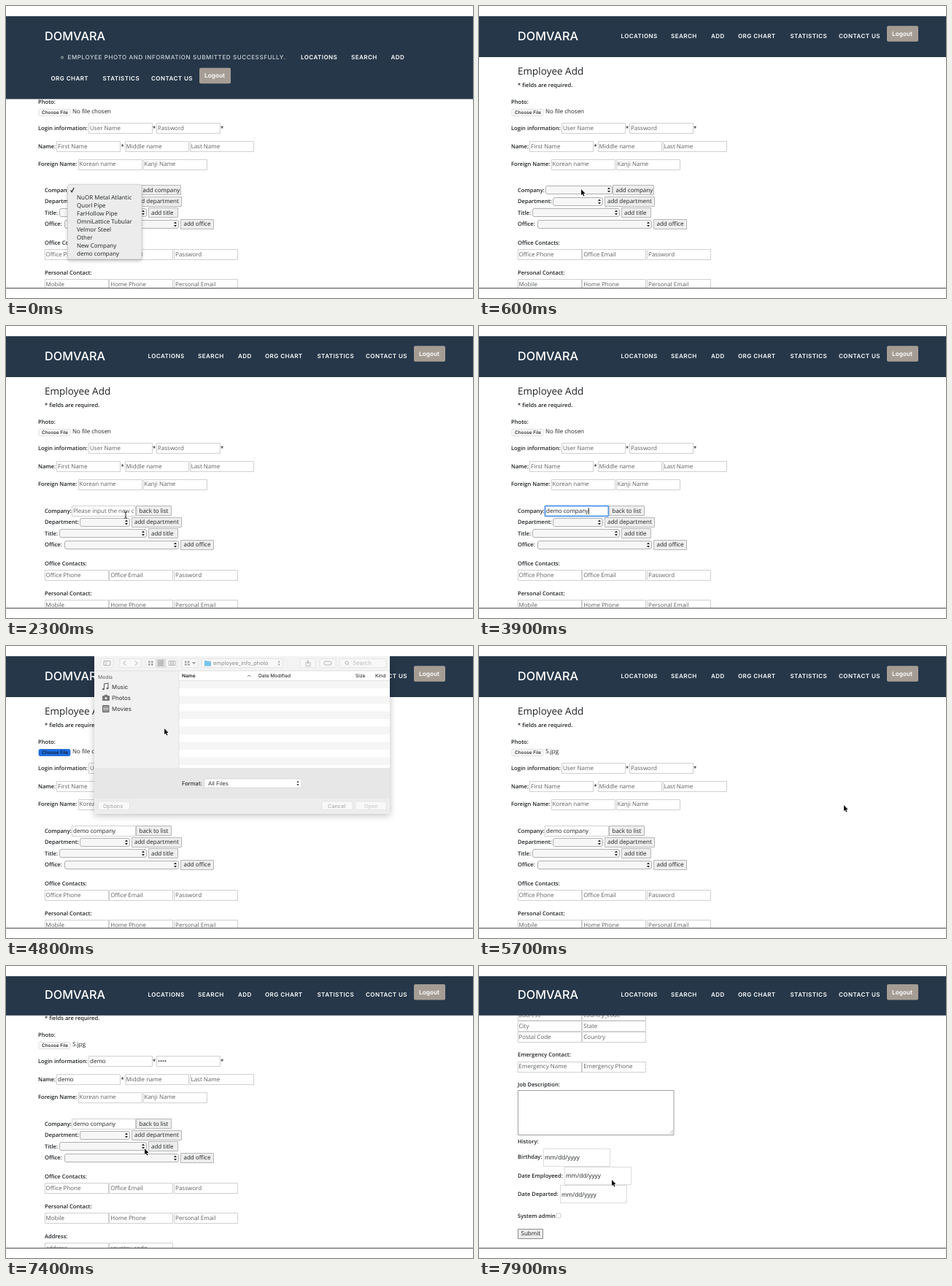
Write an HTML page with a canvas that moves like this. It is 640 px wide and 400 px high and loops after 8000 ms.

```html
<!DOCTYPE html>
<html lang="en">
<head>
<meta charset="utf-8">
<title>Employee Add</title>
<style>
  html, body { margin: 0; width: 100%; height: 100%; overflow: hidden; background: #fff; }
  canvas { display: block; width: 640px; height: 400px; }
</style>
</head>
<body>
<canvas></canvas>
<script>
const LOOP = 8000, STEP = 100, SCROLL_END = 356;
const BODY = '"Open Sans", "Noto Sans", sans-serif';
const SYSTEM = 'Inter, "Liberation Sans", sans-serif';
const INK = '#1d2124', HINT = '#5c5e61', NAVY = '#263749', BLUE = '#5b9dea';

const canvas = document.querySelector('canvas');
const c = canvas.getContext('2d');
const dpr = window.devicePixelRatio || 1;
canvas.width = 640 * dpr;
canvas.height = 400 * dpr;
c.scale(dpr, dpr);
c.textRendering = 'geometricPrecision'; // keeps fractional letter widths at small sizes

// Text is placed by its left edge and the middle of its capitals.
function text(s, x, y, { size = 8, color = INK, weight = 500, font = BODY, gap = 0 } = {}) {
  c.font = `${weight} ${size}px ${font}`;
  c.letterSpacing = gap + 'px';
  c.fillStyle = color;
  c.fillText(s, x, y + size * 0.36);
  return c.measureText(s).width;
}
const label = (s, x, y) => text(s, x, y, { size: 7.6, weight: 600 });

function box(x, y, w, h, fill, stroke, r = 0, line = 1) {
  c.beginPath();
  c.roundRect(x, y, w, h, r);
  if (fill) { c.fillStyle = fill; c.fill(); }
  if (stroke) { c.strokeStyle = stroke; c.lineWidth = line; c.stroke(); }
}

function path(points, color, width = 1) {
  c.beginPath();
  points.forEach(([x, y]) => c.lineTo(x, y));
  c.strokeStyle = color;
  c.lineWidth = width;
  c.stroke();
}

function shape(points, color) {
  c.beginPath();
  points.forEach(([x, y]) => c.lineTo(x, y));
  c.closePath();
  c.fillStyle = color;
  c.fill();
}

function shadowed(blur, draw) {
  c.save();
  c.shadowColor = 'rgba(0,0,0,.25)';
  c.shadowBlur = blur * dpr;
  c.shadowOffsetY = 2 * dpr;
  draw();
  c.restore();
}

// Widget outlines sit on half pixels so that they stay sharp.
const snap = v => Math.round(v) + .5;

function field(x, y, hint, { value = '', focus = false } = {}) {
  box(snap(x), snap(y) - 7, 87, 14, '#fff', focus ? BLUE : '#d0d0d0', focus ? 1 : 0, focus ? 2 : 1);
  c.save();
  c.beginPath();
  c.rect(x, y - 7, 86, 15);
  c.clip();
  const w = text(value || hint, x + 2, y, { color: value ? INK : HINT });
  if (focus) box(x + 2 + (value ? w : 0), y - 4, .8, 9, '#111');
  c.restore();
}

function button(s, x, y, w, edge = '#b8b8b8') {
  box(snap(x), snap(y) - 7, w - 1, 13, '#eeeeee', edge);
  text(s, x + 4.5, y);
}

function arrows(x, y, color = '#222', k = 1) {
  shape([[x - 2 * k, y - 1], [x + 2 * k, y - 1], [x, y - 3.6]], color);
  shape([[x - 2 * k, y + 1], [x + 2 * k, y + 1], [x, y + 3.6]], color);
}

function select(x, y, w) {
  box(snap(x), snap(y) - 6, w - 1, 11, '#f6f6f6', '#b0b0b0', 2.5);
  arrows(x + w - 5, Math.round(y));
}

const typed = (s, t, start, end) =>
  s.slice(0, Math.max(0, Math.ceil(s.length * Math.min(1, (t - start) / (end - start)))));

function upperForm(t) {
  text('Employee Add', 53, 89, { size: 13.5, weight: 400 });
  label('* fields are required.', 53, 108);
  label('Photo:', 44, 131);
  const pressed = t >= 4400 && t < 5000;
  box(45, 141.5, 43, 9, pressed ? '#1d6fe2' : '#fff', pressed ? '#1c62c8' : '#d2d2d2', 2, .8);
  text('Choose File', 49, 146, { size: 6.4, color: '#111', font: SYSTEM });
  text(t >= 5700 ? '5.jpg' : 'No file chosen', 91, 144.5);

  label('Login information:', 44, 167);
  field(113, 167, 'User Name', { value: typed('demo', t, 6400, 6700), focus: t >= 6100 && t < 6800 });
  label('*', 201, 167.5);
  field(206, 167, 'Password', { value: typed('••••', t, 6800, 7000), focus: t >= 6800 && t < 7000 });
  label('*', 294, 167.5);

  label('Name:', 44, 192);
  field(69, 192, 'First Name', { value: typed('demo', t, 7000, 7200), focus: t >= 7000 && t < 7300 });
  label('*', 157.5, 192.5);
  field(162.5, 192, 'Middle name');
  field(251.5, 192, 'Last Name');

  label('Foreign Name:', 44, 216.5);
  field(98.5, 216.5, 'Korean name');
  field(187.5, 216.5, 'Kanji Name');
}

function lowerForm(t) {
  label('Company:', 53, 253);
  if (t < 1900) {
    select(91, 253, 92);
    button('add company', 183, 253, 57);
  } else {
    field(90, 253, 'Please input the new company', {
      value: typed('demo company', t, 2700, 3600), focus: t >= 2500 && t < 4400 });
    button('back to list', 178, 253, 49);
  }
  label('Department:', 53, 268.5);
  select(101, 268.5, 69);
  button('add department', 171.5, 268.5, 69);
  label('Title:', 53, 284);
  select(73, 284, 120);
  button('add title', 194.5, 284, 41);
  label('Office:', 53, 299.5);
  select(80, 299.5, 157);
  button('add office', 239, 299.5, 46);

  const row = (y, ...hints) => hints.forEach((h, i) => field(53 + i * 88.8 - .5, y, h));
  label('Office Contacts:', 53, 325.5);
  row(341, 'Office Phone', 'Office Email', 'Password');
  label('Personal Contact:', 53, 366);
  row(382, 'Mobile', 'Home Phone', 'Personal Email');
  label('Address:', 53, 407);
  row(423, 'address', 'country_code');
  row(438, 'City', 'State');
  row(453, 'Postal Code', 'Country');
  label('Emergency Contact:', 53, 477.5);
  row(493.5, 'Emergency Name', 'Emergency Phone');

  label('Job Description:', 53, 518);
  box(53.5, 526.5, 213.5, 61, '#fff', '#a0a0a0');
  path([[261, 586], [266, 581]], '#999', .7);
  path([[264, 586], [266, 584]], '#999', .7);
  label('History:', 53, 596.5);
  [['Birthday:', 88], ['Date Employeed:', 117], ['Date Departed:', 111]].forEach(([s, x], i) => {
    const y = 617.5 + i * 25.4;
    label(s, 53, y);
    box(x + .5, snap(y - 12), 91, 24, '#fff', '#dcdcdc');
    text('mm/dd/yyyy', x + 2, y + .5, { size: 8.2 });
  });
  label('System admin', 53, 698);
  box(106, 695, 6, 6, '#fff', '#bbb', 1, .8);
  button('Submit', 53, 722.5, 35, '#8d8d8d');
}

function popup(items) {
  const h = 14.5 + items.length * 11;
  shadowed(5, () => box(84.5, 244.5, 101.5, h, '#ececec', null, 3));
  box(84.5, 244.5, 101.5, h, null, '#c4c4c4', 3, .6);
  path([[88.5, 252.5], [90.2, 254.8], [93.2, 249]], '#222', 1.2);
  items.forEach((s, i) => text(s, 97, 262.5 + i * 11));
}

const companies = ['NuOR Metal Atlantic', 'Quorl Pipe', 'FarHollow Pipe', 'OmniLattice Tubular',
  'Velmor Steel', 'Other', 'New Company'];

function nav(tall, lift) {
  const link = { size: 8, color: '#fff', weight: 600, font: SYSTEM, gap: .45 };
  const links = list => list.forEach(([s, x, y]) => text(s, x, y, link));
  const logout = (x, y) => {
    box(x, y - 10.8, 43, 21.6, '#a59d94', null, 2);
    text('Logout', x + 7, y, { ...link, size: 8.3, gap: 0 });
  };
  box(0, 14, 640, tall ? 113.5 : 56 - lift, NAVY);
  text('DOMVARA', 53, 41.5 - lift, { size: 16.3, color: '#fff', font: SYSTEM });
  if (tall) {
    c.beginPath();
    c.arc(77, 70.5, 1.5, 0, 7);
    c.strokeStyle = '#d0d5da';
    c.lineWidth = .8;
    c.stroke();
    text('EMPLOYEE PHOTO AND INFORMATION SUBMITTED SUCCESSFULLY.', 84.5, 70.5,
      { ...link, color: '#d0d5da', weight: 500, gap: .6 });
    links([['LOCATIONS', 404, 70.5], ['SEARCH', 473, 70.5], ['ADD', 527.5, 70.5],
      ['ORG CHART', 61.5, 99], ['STATISTICS', 132.5, 99], ['CONTACT US', 199, 99]]);
    logout(265, 95.5);
  } else {
    const y = 41.5 - lift;
    links([['LOCATIONS', 194.5, y], ['SEARCH', 263, y], ['ADD', 318, y], ['ORG CHART', 355, y],
      ['STATISTICS', 426.5, y], ['CONTACT US', 493, y]]);
    logout(559, 38 - lift);
  }
}

function fileDialog(t) {
  const ui = (s, x, y, size = 7.6, color = '#333', weight = 400) =>
    text(s, x, y, { size, color, weight, font: SYSTEM });
  const frame = (x, w, y = 17.5, h = 12) => box(x, y, w, h, '#f8f8f8', '#dedede', 2, .7);
  const grey = '#a3a3a3';
  const ready = t >= 4900, picked = t >= 5200;

  shadowed(9, () => box(121, 14, 405, 216, '#ededed'));
  box(121, 14, 405, 20, '#f3f3f3');
  box(121, 34, 116, 133, '#f1f1f1');
  box(237, 34, 289, 133, '#fff');
  for (let y = 47.5; y < 167; y += 21) box(237, y, 289, 10.5, '#f5f5f5');
  box(121, 167, 405, 42, '#e7e7e7');
  path([[121, 34], [526, 34]], '#d6d6d6', .7);
  path([[237, 47.5], [526, 47.5]], '#dcdcdc', .7);
  path([[237, 34], [237, 167]], '#dcdcdc', .7);

  // Toolbar
  [[130, 17], [156, 29], [191, 43], [241, 22], [268, 111], [403, 21], [430, 22], [457, 64]]
    .forEach(([x, w]) => frame(x, w));
  box(205, 17.5, 14.5, 12, '#dedede');
  box(134, 20.5, 9, 6, null, grey, 0, .8);
  path([[137, 20.5], [137, 26.5]], grey, .8);
  path([[164, 20.5], [161, 23.5], [164, 26.5]], grey);
  path([[177, 20.5], [180, 23.5], [177, 26.5]], grey);
  for (let i = 0; i < 4; i++) {
    box(195 + i % 2 * 4, 20.5 + (i >> 1) * 3.6, 2.6, 2.6, grey);
    path([[208, 20 + i * 2.2], [216, 20 + i * 2.2]], '#888', .8);
    box(245 + i % 2 * 4, 20.5 + (i >> 1) * 3.6, 2.6, 2.6, grey);
  }
  for (let i = 0; i < 3; i++) box(223 + i * 3, 20.5, 3, 6, null, grey, 0, .7);
  shape([[255, 22], [260, 22], [257.5, 25.5]], grey);
  shape([[272, 20], [275, 20], [276, 21], [281, 21], [281, 27.5], [272, 27.5]], '#76c3ea');
  ui('employee_info_photo', 284, 23.5, 7.5, '#8e8e8e');
  arrows(374, 23.5, grey, .8);
  box(411, 22.5, 6, 5, null, grey, 0, .7);
  path([[414, 25], [414, 19.5], [412.4, 21]], grey, .8);
  box(436, 21, 10, 5, null, grey, 2, .8);
  c.beginPath();
  c.arc(467, 23, 2.2, 0, 7);
  c.stroke();
  path([[468.6, 24.6], [470.5, 26.5]], grey, .8);
  ui('Search', 475, 23.5, 7.8, '#bcbcbc');

  // Sidebar
  ui('Media', 126, 43, 6.8, '#777', 500);
  path([[134.5, 59], [134.5, 52], [140, 51], [140, 58]], '#666', 1.1);
  box(132, 57.8, 3, 2.4, '#666', null, 1.2);
  box(137.5, 56.8, 3, 2.4, '#666', null, 1.2);
  box(132, 68, 10, 7, '#777', null, 1);
  box(135, 66.8, 4, 2, '#777');
  box(135.5, 70, 3, 3, '#eee', null, 1.5);
  box(132.5, 81.5, 8.5, 9, '#999', '#666', 0, 1);
  path([[133, 86], [141, 86]], '#eee', .8);
  ['Music', 'Photos', 'Movies'].forEach((s, i) => ui(s, 145, 56 + i * 15, 7.9));

  // File list
  ui('Name', 241, 41, 6.6, '#222', 600);
  path([[331, 42], [333, 40], [335, 42]], '#555', .8);
  ui('Date Modified', 346, 41, 6.6, '#333', 500);
  ui('Size', 479, 41, 6.6, '#333', 500);
  ui('Kind', 506, 41, 6.6, '#333', 500);
  if (ready) for (let i = 0; i < 5; i++) {
    const y = 53 + i * 10.5, on = picked && i === 4, ink = on ? '#fff' : '#333';
    if (on) box(237, y - 5.5, 289, 10.5, '#1e67d8');
    box(242, y - 3, 5, 6, '#cfd8df', '#a9b4bc', 0, .5);
    ui(`${i + 1}.jpg`, 251, y, 7, ink);
  }

  ui('Format:', 241, 188, 7.6, '#333', 500);
  box(272, 182, 133, 12, '#fff', '#d0d0d0', 2, .7);
  ui('All Files', 277, 188);
  arrows(400, 188, '#444', .8);
  frame(126.5, 43, 213, 11.5);
  frame(433, 42, 213, 11.5);
  frame(479, 42, 213, 11.5);
  ui('Options', 133, 219, 7.4, ready ? '#444' : grey);
  ui('Cancel', 441, 219, 7.4, ready ? '#444' : grey);
  ui('Open', 491, 219, 7.4, picked ? '#222' : '#c8c8c8');
}

// Pointer stops: time, x, y
const stops = [[100, 230, 200], [500, 140, 251], [700, 140, 251], [900, 145, 290], [1300, 190, 233],
  [1600, 210, 252], [1900, 210, 252], [2300, 164, 259], [2500, 150, 254], [3900, 150, 254],
  [4300, 68, 146], [4500, 68, 146], [4800, 217, 113], [5100, 260, 94], [5200, 260, 94],
  [5500, 500, 218], [5700, 500, 218], [6100, 174, 160], [7100, 174, 160], [7400, 190, 250],
  [7900, 182, 293]];

function pointer(t) {
  const hidden = t < 100 || (t >= 2700 && t < 4000) || (t >= 6400 && t < 7200);
  if (hidden) return;
  const i = Math.max(1, stops.findIndex(s => s[0] >= t));
  const [a, b] = [stops[i - 1], stops[i]];
  const p = (t - a[0]) / (b[0] - a[0]), k = p * p * (3 - 2 * p);
  const x = a[1] + (b[1] - a[1]) * k, y = a[2] + (b[2] - a[2]) * k;
  c.save();
  c.translate(x, y);
  if ((t >= 2300 && t < 2700) || (t >= 6100 && t < 6400)) {
    path([[0, -4], [0, 4]], '#222', 1);
    for (const s of [-1, 1]) path([[-2, s * 4.5], [0, s * 3.7], [2, s * 4.5]], '#222', .9);
  } else {
    const arrow = [[0, 0], [0, 8.2], [1.8, 6.5], [3.2, 9.6], [4.5, 9], [3.2, 6], [5.6, 5.8]];
    path([...arrow, [0, 0]], '#fff', 1.4);
    shape(arrow, '#111');
  }
  c.restore();
}

function draw(t) {
  const p = Math.min(1, Math.max(0, (t - 7300) / 500));
  const scroll = Math.round(SCROLL_END * p * p * (3 - 2 * p));
  box(0, 0, 640, 400, '#fff');
  c.save();
  c.beginPath();
  c.rect(0, 14, 640, 372);
  c.clip();
  c.translate(0, -scroll);
  upperForm(t);
  if (t < 1900) c.translate(0, -1); // the list is a pixel shorter than the text field
  lowerForm(t);
  c.restore();

  nav(t < 100, scroll > 0 ? 2.3 : 0);
  if (t < 100) popup([...companies, 'demo company']);
  else if (t >= 700 && t < 1500) popup(companies);
  if (t >= 4600 && t < 5700) {
    c.save();
    c.beginPath();
    c.rect(0, 14, 640, 372);
    c.clip();
    c.translate(0, t < 4700 ? -108 : 0);
    fileDialog(t);
    c.restore();
  }
  box(0, 386, 640, 1, '#4a4a4a');
  pointer(t);
}

function tick(now) {
  draw(Math.floor(now % LOOP / STEP) * STEP);
  requestAnimationFrame(tick);
}
draw(0);
requestAnimationFrame(tick);
</script>
</body>
</html>
```
